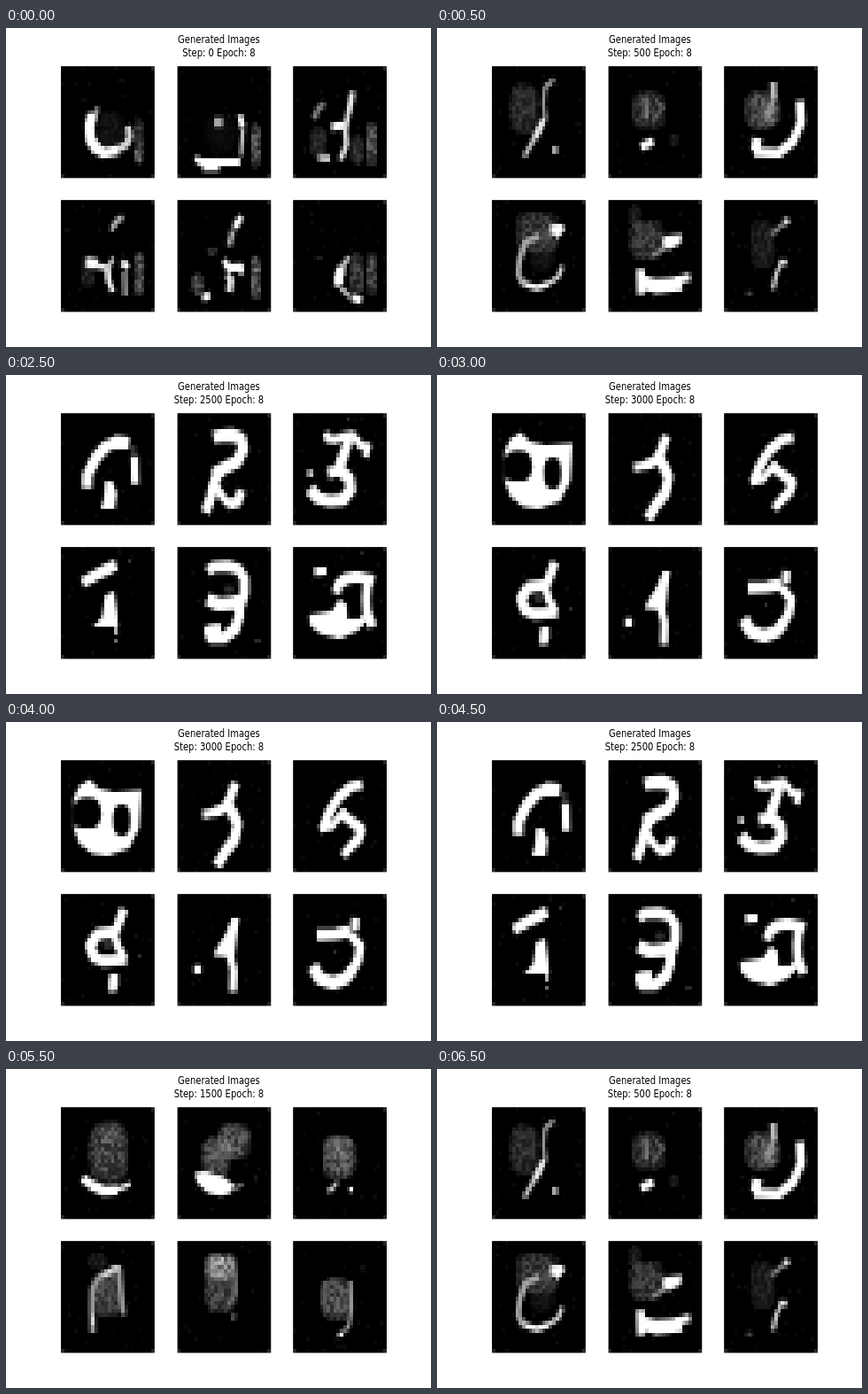
Recreate the animation shown at these times as an HTML page with a canvas. Size 480 px wide and 360 px high, loop 7 s.

```html
<!DOCTYPE html>
<html lang="en">
<head>
<meta charset="utf-8">
<title>Generated Images</title>
<style>
  html, body { margin: 0; width: 480px; height: 360px; overflow: hidden; background: #fff; }
  /* The square-pixel figure is squeezed as a whole into the 4:3 stage. */
  #figure { position: relative; width: 573px; height: 360px; transform: scaleX(calc(480 / 573)); transform-origin: 0 0; }
  #caption { position: absolute; left: .5px; top: 6px; width: 100%; text-align: center; color: #000; font: 11.95px/15px "DejaVu Sans", sans-serif; }
  #tiles { position: absolute; left: 0; top: 0; transform: translate(74.2px, 43.3px); display: grid; grid-template-columns: repeat(3, 126px); gap: 25px 30.7px; }
  canvas { display: block; width: 126px; height: 126px; image-rendering: pixelated; background: #000; }
</style>
</head>
<body>
<div id="figure">
  <div id="caption">Generated Images<br><span id="step">Step: 0 Epoch: 8</span></div>
  <div id="tiles"></div>
</div>
<script>
const SIZE = 28, HOLD = 500, LAST = 7;
const label = document.getElementById('step');
const tiles = document.getElementById('tiles');
const pens = Array.from({ length: 6 }, () => {
  const canvas = document.createElement('canvas');
  canvas.width = canvas.height = SIZE;
  tiles.append(canvas);
  return canvas.getContext('2d');
});

let seed = 1;
const random = () => (seed = seed * 16807 % 2147483647) / 2147483647;
const grey = g => `rgb(${g},${g},${g})`;

// Painters: each returns a function that draws on one 28 x 28 tile.
const ink = (path, width = 2.5, g = 255) => pen => {
  pen.strokeStyle = grey(g);
  pen.lineWidth = width;
  pen.stroke(new Path2D(path));
};
const blot = (path, g = 255) => pen => {
  pen.fillStyle = grey(g);
  pen.fill(new Path2D(path));
};
const hole = (x, y, rx, ry, g = 0) => pen => {
  pen.fillStyle = grey(g);
  pen.beginPath();
  pen.ellipse(x, y, rx, ry, 0, 0, 2 * Math.PI);
  pen.fill();
};
const haze = (cx, cy, rx, ry, g) => pen => {
  for (let y = 0; y < SIZE; y++) for (let x = 0; x < SIZE; x++) {
    const d = Math.abs((x + .5 - cx) / rx) ** 3 + Math.abs((y + .5 - cy) / ry) ** 3;
    if (d >= 1) continue;
    pen.fillStyle = `rgba(255,255,255,${g / 255 * Math.sqrt(1 - d) * (.45 + .8 * random())})`;
    pen.fillRect(x, y, 1, 1);
  }
};
const fringe = (y, g = 90) => haze(23.4, y, 1.6, 6, g);

const scenes = [];

scenes.push([
  [haze(15, 16, 4, 5, 22), fringe(19, 60), ink('M11.2 10.6L9 13', 1.5, 150),
    ink('M9.4 12L8.4 15L8.8 18.6L11 21', 3), ink('M10 20.5L13 21.8L17.3 21', 2.6),
    ink('M17 21L19.8 19.4L20.6 17.5L20 15', 2, 215), ink('M22.5 21L23.5 24', 1.2, 120)],
  [fringe(20), haze(13, 17, 5, 5, 12), blot('M11 12.8h2.6v2.4h-2.6z', 165),
    ink('M18.6 12.2L19.6 15.5', 1.8), ink('M19.6 16L19 22.5', 1.2, 190),
    ink('M5.2 23L7 24L18.8 24', 1.9), ink('M7.5 25L12.5 25', 2.6)],
  [fringe(19.5, 100), haze(19, 21, 2, 4, 50), haze(7.5, 19, 2.5, 4, 50),
    ink('M6.2 13.2L7.5 10.5L9.5 9.3', 1.5, 125), ink('M17.8 6.4L16.6 12', 1.8, 230),
    ink('M11.4 15.2L16 14.8', 1.9), ink('M16.5 12L15.6 16L16 19.5L14.2 23.5', 1.6, 220),
    ink('M7.4 23L11 23.2', 1.7, 215)],
  [fringe(18.5), haze(8, 18, 2.5, 4, 40), ink('M15 7.6L16.6 5.4L18.5 4.3', 1.6, 175),
    ink('M7.4 15.5L11 16', 2.3), ink('M11 16.5L14 17L14.2 20L15.6 23', 1.7, 235),
    ink('M14 17L15.8 14.5', 1.3, 190), ink('M18.3 15.4L20 17', 1.9),
    ink('M19 18L19.2 24', 1.4, 150)],
  [fringe(19.5, 110), haze(6, 21, 2, 3, 90), haze(10.5, 13, 1.2, 1.5, 60),
    ink('M19.2 4.2L17 6.8', 2), ink('M16.6 7.5L15.5 11.5', 1.5, 165),
    ink('M14 15L15.4 17L19 16.8L19 18.4', 1.9), ink('M15 18.5L16 20L15.5 23', 1.9, 225),
    ink('M7.5 24.6L9.8 23.7', 1.8)],
  [fringe(18.5, 80), haze(19, 18.5, 2.4, 5.5, 65), haze(8.3, 14.5, 1, 1, 50),
    ink('M16.8 14.2L14.4 17', 1.5, 190), ink('M14.5 17L13.4 20L14 21.5', 2.7),
    ink('M14.3 22L17 24.2', 1.4, 190), ink('M17.6 24.4L20.4 25.2', 2)]
]);

scenes.push([
  [haze(9.6, 10.5, 4.5, 6.5, 55), ink('M18.5 3.2L15.8 5.5L15.4 9.5L16 13', 1.3, 150),
    ink('M15.8 13L12.8 18', 1.8, 230), ink('M12.8 18L9.6 22.6', 1.4, 190),
    blot('M18 20.2h1.6v1.5h-1.6z', 225)],
  [haze(12, 11, 5.5, 5, 58), ink('M11 7.5L11.5 13', 1.2, 120),
    ink('M14 8.5L16.5 10L13.5 13.5', 1, 100), haze(19.5, 18.5, 1.3, 2, 30),
    ink('M9.8 20.2L13.4 18.8', 2.2)],
  [haze(11.5, 11, 5.5, 5, 85), haze(13, 12, 3, 3, 60), ink('M14.7 4L14.8 8', 1.8, 190),
    ink('M14.7 8L13.5 12', 1.5, 150), ink('M22.6 8.6L23 14L20.6 18.8L16.5 21.8L9 21.5', 2.6),
    ink('M8.2 19.4L11 20', 3.4)],
  [haze(13.5, 8, 7, 5.5, 65), haze(15, 13, 4, 5, 22), ink('M17.4 7.3L20.6 7.2L18.8 9', 2.3),
    ink('M14 9L10 10.5L8.2 15L7.8 18.5L9.4 21', 1.8, 165),
    ink('M9.4 21L13.5 22L17 21', 1.6, 245), ink('M17 21L20 19L21 16.4', 1.5, 205)],
  [haze(11.5, 10, 5.5, 5.5, 65), haze(8, 4, 2, 3, 35), blot('M16.5 9L22 8.5L21.5 11L18 12.6L16 11.5Z'),
    ink('M13 14L17 12', 1.2, 140), ink('M9.6 17.3L9.8 23.6', 2.6),
    ink('M9.5 20.4L14 21.6L22 21', 3.6), ink('M20 20.2L24.5 19.2', 2.2)],
  [haze(11.5, 11, 4, 6.5, 38), ink('M14.3 8.6L18 5.7', 1.3, 130), ink('M18 5.6L19.4 5', 1.7, 225),
    ink('M16.4 15.6L18.8 15.6', 1.5, 225), ink('M17 16L15.6 18.5L14.6 22.4', 1.3, 200),
    ink('M6.6 23.3L8.4 23.3', .9, 95)]
]);

scenes.push([
  [haze(13, 10, 5.5, 7.5, 80), ink('M8 17.5L11 20.5L16 20.8L19.5 18', 2.1, 235)],
  [haze(14, 10.5, 5.5, 7, 85), ink('M9 20.5L14 21.2L17.5 18.5', 2.2)],
  [haze(13.5, 12, 5.5, 7, 85), ink('M18.5 9L19.5 14L16.5 20L11.5 21.6', 2, 225)],
  [haze(13.5, 11, 5.5, 7, 85), ink('M17.5 7.5L11 9L9 14L9.6 20.5', 1.8, 190)],
  [haze(13, 10, 5.5, 7, 85), ink('M11 7L16.5 7.5L17 10', 2, 225), ink('M11 20L18 20.8', 2.2, 230)],
  [haze(13, 13, 5, 7, 65), ink('M17.5 12L17 18L14.2 23', 1.5, 200)]
]);

scenes.push([
  [haze(14.3, 11.3, 6.2, 7.8, 82), haze(15, 6, 3.5, 3, 35),
    ink('M6.4 17.8L9.6 19.8L13 21L17 20.8', 2.5), ink('M17 20.6L20.8 19.2', 1.4, 235)],
  [haze(17, 8.5, 5, 4.8, 95), haze(11.5, 12.5, 4.5, 5.5, 85),
    blot('M5 16.4L8 16L14 17.5L17 19.5L16 21.5L13 22.3L9 21.5L6 19Z'),
    ink('M17 20.3L19.6 19.4', 1, 145), haze(23.5, 18, 1, 1.5, 25)],
  [haze(13.8, 12.5, 5.2, 5.7, 100), haze(14, 9.5, 4, 2.5, 35),
    ink('M13.4 18.6L12 20L10.4 21.3', 1.2, 190), blot('M16.8 20h1.2v1.2h-1.2z')],
  [haze(13.8, 13, 5, 6, 85), haze(11, 5, 3, 2, 35),
    ink('M9.5 23L9.3 17L9.4 12L11.5 9L14 8L17.5 7L17.8 12L18.7 18.5', 1.6, 150),
    ink('M12.6 8.5L14.5 7.8L15 7L17.6 6.6', 1.1, 230), ink('M9.5 18.5L9.5 21', 1, 215)],
  [haze(13, 11, 5.3, 7.5, 80), haze(13, 6.4, 5, 3.5, 130), ink('M17 8L17.4 13L15 16', 1.1, 115),
    ink('M12.3 5.5L13.5 4.5', 1, 235), ink('M17 18.4L16.6 19.6', 1.1, 145)],
  [haze(13, 14.5, 4.8, 5.8, 88), haze(21, 7, 1.5, 1.5, 18),
    ink('M9.3 10L9 16', 1, 105), ink('M17.2 10L17.5 17L16.8 21L15.4 22.6', 1.2, 150),
    ink('M13.6 23.6L15 23.2', 1.2)]
]);

scenes.push([
  [haze(14, 12, 5, 6, 30), ink('M8.5 16L10 10.5L15 7.5L20 9.5', 2.6, 245), ink('M14 17L14.5 22', 2.6, 245)],
  [haze(14, 12, 5, 6, 30), ink('M11 7L16 6L18.5 9L14 13.5L10.5 21.5', 2.7, 245), ink('M11 21L18.5 21', 2.4, 240)],
  [ink('M10 7L18.5 7L14 13L18.5 17L14.5 22L8 20.5', 2.6, 245)],
  [haze(13, 11, 4, 5, 30), ink('M9 9L16.5 6L15 14L14.5 22', 2.6, 245)],
  [ink('M10 7L17 6L18 10L13 13L18.5 17L15 22L9.5 21', 2.7, 245)],
  [haze(14, 12, 4, 5, 30), ink('M11 12L15 8L20 10L20.5 16L15 21L8 19', 2.7, 245)]
]);

scenes.push([
  [ink('M7.8 18.8L7.8 15.5L10.6 11L13.4 8.4L16.6 7.1L20.4 7.5', 3.1), ink('M21.8 8.5L21.8 9.6', 1.2, 130),
    ink('M22 10.8L22.2 17.8', 2.2), blot('M13.3 17L15.5 17L16.8 20L16.2 24L12 24L13 21Z')],
  [ink('M10.8 6L13 5.6L16 5.4L19 6.4L19.6 9L18 12L13.5 14L11 15.5', 3.3),
    ink('M12.6 14L10.8 18L10 21L8.4 24.8', 3), ink('M11.5 18.5L13.6 21L15.8 23', 2.3),
    ink('M15.2 23L18 22.2L19.2 19.2', 2.8)],
  [ink('M10 4.8L10.4 6.4L13 6.6L15 5.8L18.6 5.4', 2.1), ink('M18 5.6L20.4 8.2L22.4 8.2L21.6 11', 2),
    ink('M16.8 6L15.2 10.4L13.4 14.4L10.4 15', 2.9),
    ink('M13.6 14L16.8 16.4L17.2 19.2L15 21.6L11 22L7.2 21.2L5 18.8', 3.2),
    ink('M4.4 15.2L6 15', 1.7, 230), blot('M16 1h1v1h-1z', 45)],
  [ink('M6.4 9L11.4 6.6L16.6 4.4', 2.8),
    blot('M13.3 12L16 11L16.8 16L17.2 20L9.4 20L12.4 17.5Z'),
    ink('M16.5 20L16.6 22', 1, 190), blot('M16 23h1v1h-1z', 110),
    blot('M20 3h1v1h-1z', 55)],
  [ink('M9 6.2L11 4.8L15 4.6L18.4 5.6L20 8L20 11.5L18.6 15.5', 2.8),
    ink('M8.8 13L12.4 14.4L17.6 14', 3.4),
    ink('M18.2 12L18.6 17L17.2 20.6L14 22.8L10 22.8L9.4 21L13 20.4', 3),
    hole(15.4, 10.6, 1.4, 1.2, 45), blot('M23 23h2v1h-2z', 40)],
  [ink('M6.4 6.1L10 6', 2.1), ink('M12.8 11.6L13.4 9.6L15.6 8L19 7.4L24.2 8.4', 2.8),
    ink('M22.2 9L21.8 13L22 16L23.8 20', 2.7),
    blot('M4.8 17L8 16.4L11.4 16L14 13L16 14.5L16.2 18L21.4 18L19.4 21L14 22.9L8 21.7L5 19.6Z'),
    ink('M22 17L19.6 19.4', 2), blot('M20 1h1v1h-1z', 35)]
]);

scenes.push([
  [blot('M3.8 9.5L5.4 6.4L8.5 4.8L11.2 7L16 8L24 7.4L23.4 17L20.5 22L14 24L9.5 23.6L5.5 21L3.8 17Z'),
    hole(7.8, 13.2, 4.3, 3.9), blot('M3.4 11.5L7 11L7 16L3.4 16.8Z', 0),
    hole(18.2, 15, 2.6, 4)],
  [ink('M17.3 5.6L15.8 9.5L14 12L11 13', 2.6), ink('M7.5 13.6L13 12.8', 2.1),
    ink('M15 11L16.4 13L18 16L17 20L14 23.3L11.8 26.5', 3)],
  [ink('M20.6 6L17 6.8L13.5 9.4L10.8 13L9 17', 2.7), ink('M7.8 17.2L11.5 16.4L13.6 14.5L15.6 12.4', 2),
    ink('M14.4 13.3L18 15.6L20.4 17.4L19.3 20L16.8 22L15 24', 2.6)],
  [ink('M18.8 3.8L17.2 7.5L16.4 9.5', 2.5), ink('M16 9.5L11 10L8.6 13L10 15.8L13 16.8L19.6 16.4', 2.9),
    ink('M15.6 9L17 13L18.8 16', 2.3), hole(14, 12.8, 1.5, 1.2, 45),
    blot('M14.6 20h2.6v2.4l-.6 2h-2.4v-2.4z'), blot('M23 15h1v1h-1z', 45)],
  [blot('M16.3 6L18.4 6L17.6 11.5L17 16L14.5 15.8L10.8 15.6L12 13L14.5 10Z'),
    ink('M15.6 15L16.8 19L16.6 24.5', 2.2), blot('M4.8 17.8h2.3v2.2h-2.3z')],
  [ink('M7 10.3L13 10L17 9.3', 2.9), ink('M18.8 6L18.4 9', 2.3),
    ink('M17 9.8L20 13L19.4 16.5L17.5 19.5', 2.5), ink('M5.8 18L8 21.2L12 22.4L16 21L17.8 18.8', 3.3),
    blot('M12 14h1v1h-1z', 45)]
]);

scenes.push([
  [ink('M10 7L17 6.5L18.5 10L13.5 13.5L18.5 17L16 22L9 22', 2.8)],
  [ink('M17 6L11 10L10.5 14.5L16.5 15L17 23', 2.8)],
  [ink('M10 9L15 6L19.5 9L17 14L11 12.5L10 9', 2.5), ink('M17.5 13L15 23', 2.5)],
  [ink('M15.5 5L14.5 14L13 23', 2.9)],
  [ink('M9 8L18 7L15 14L11.5 24', 2.8)],
  [ink('M15 6L10 12L9.5 19L14 22L18.5 18L16 14.5L10.5 17', 2.7)]
]);

function grain(pen) {
  for (let i = 0; i < 30; i++) {
    pen.fillStyle = grey(Math.round(14 * random()));
    pen.fillRect(Math.floor(random() * SIZE), Math.floor(random() * SIZE), 1, 1);
  }
  pen.fillStyle = grey(40);
  for (const [x, y] of [[0, 27], [27, 0], [27, 27]]) pen.fillRect(x, y, 1, 1);
}

function show(scene) {
  seed = 77 + scene;
  label.textContent = `Step: ${scene * 500} Epoch: 8`;
  pens.forEach((pen, i) => {
    pen.fillStyle = '#000';
    pen.fillRect(0, 0, SIZE, SIZE);
    pen.lineJoin = 'round';
    grain(pen);
    scenes[scene][i].forEach(paint => paint(pen));
  });
}

let current = -1;
function tick() {
  const slot = Math.floor(performance.now() / HOLD) % (2 * LAST);
  const scene = LAST - Math.abs(LAST - slot);
  if (scene !== current) show(current = scene);
  requestAnimationFrame(tick);
}
tick();
</script>
</body>
</html>
```
